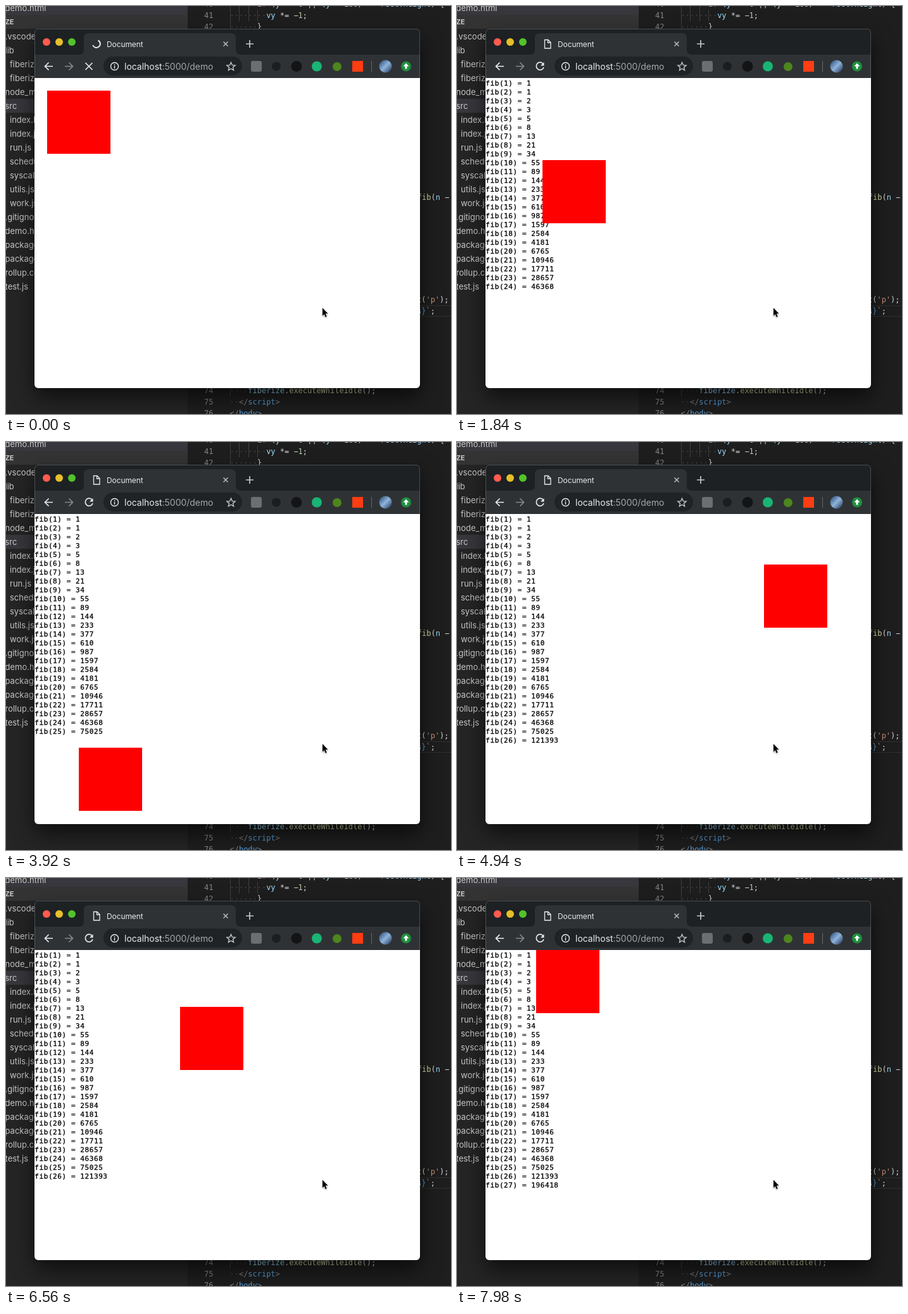
An HTML page for the animation above (8000 ms loop, 703 by 646 pixels).

```html
<!DOCTYPE html>
<html lang="en">
<head>
<meta charset="utf-8">
<title>Fibonacci demo</title>
<style>
  html, body { margin: 0; width: 100%; height: 100%; overflow: hidden; background: #1e1e1e; }
  svg { display: block; width: 703px; height: 646px; }
  text { white-space: pre; }
  .ui { font-family: Inter, "Noto Sans", sans-serif; }
  .mono { font: 12px "DejaVu Sans Mono", monospace; letter-spacing: -.02px; }
  .results { font-size: 11px; letter-spacing: .58px; stroke: #000; stroke-width: .3px; }
  .files { font-size: 13px; fill: #c8c8c8; }
  .code { fill: #d4d4d4; }
  .num { fill: #858585; }
  .fn { fill: #dcdcaa; }
  .var { fill: #9cdcfe; }
  .lit { fill: #b5cea8; }
  .str { fill: #ce9178; }
  .tag { fill: #569cd6; }
  .dim { fill: #808080; }
  .dot { fill: #484848; }
  .key { fill: #c586c0; }
  .window { filter: drop-shadow(0 15px 17px rgba(0, 0, 0, .62)); }
  .cursor { filter: drop-shadow(0 1px 1px rgba(0, 0, 0, .4)); }
  .line { fill: none; stroke: #e8eaed; stroke-width: 1.7; }
</style>
</head>
<body>
<svg viewBox="0 0 703 646">
  <defs>
    <clipPath id="pageClip"><path d="M45 114H654V599a6 6 0 0 1-6 6H51a6 6 0 0 1-6-6z"/></clipPath>
    <linearGradient id="photo" x1="0" y1="0" x2="1" y2="1">
      <stop offset="0" stop-color="#23406f"/>
      <stop offset=".5" stop-color="#8fb4da"/>
      <stop offset="1" stop-color="#1c3158"/>
    </linearGradient>
  </defs>

  <!-- editor -->
  <rect width="703" height="646" fill="#1e1e1e"/>
  <rect width="287" height="646" fill="#252526"/>
  <rect width="287" height="14" fill="#37373d"/>
  <rect y="14" width="287" height="22" fill="#343435"/>
  <rect y="147" width="287" height="22" fill="#37373d"/>
  <g id="files" class="ui files">
    <text x="-1.500" y="8">demo.html</text>
    <text x="-1.500" y="29" font-size="11" font-weight="700">ZE</text>
  </g>
  <path d="M287 474.500H703M287 491.500H703" stroke="#303030"/>
  <path d="M354.500 0V36M368.500 0V24M383.500 0V24M397.500 6V24M354.500 600V618" stroke="#404040"/>
  <g class="mono num">
    <text x="313" y="1">40</text><text x="313" y="19">41</text><text x="313" y="37">42</text>
    <text x="313" y="613">74</text><text x="313" y="631">75</text><text x="313" y="649">76</text>
  </g>
  <g class="mono code">
    <text x="397" y="1"><tspan class="key">if</tspan> (<tspan class="var">y</tspan> &lt;= <tspan class="lit">0</tspan> || (<tspan class="var">y</tspan> + <tspan class="lit">100</tspan>) &gt;= <tspan class="var">rect</tspan>.<tspan class="var">height</tspan>) {</text>
    <text x="353.500" y="19"><tspan class="dot">········</tspan><tspan class="var">vy</tspan> *= −<tspan class="lit">1</tspan>;</text>
    <text x="353.500" y="37"><tspan class="dot">······</tspan>}</text>
    <text x="649.800" y="307"><tspan class="fn">fib</tspan>(<tspan class="var">n</tspan> −</text>
    <text x="649" y="469"><tspan class="fn">t</tspan>(<tspan class="str">'p'</tspan>);</text>
    <text x="649" y="487"><tspan class="var">s</tspan><tspan class="tag">}</tspan><tspan class="str">`</tspan>;</text>
    <text x="353.500" y="613"><tspan class="dot">····</tspan><tspan class="var">fiberize</tspan>.<tspan class="fn">executeWhileIdle</tspan>();</text>
    <text x="353.500" y="631"><tspan class="dot">··</tspan><tspan class="dim">&lt;/</tspan><tspan class="tag">script</tspan><tspan class="dim">&gt;</tspan></text>
    <text x="353.500" y="649"><tspan class="dim">&lt;/</tspan><tspan class="tag">body</tspan><tspan class="dim">&gt;</tspan></text>
  </g>

  <!-- browser window -->
  <rect class="window" x="45" y="36" width="609" height="569" rx="6" fill="#1d2123"/>
  <path d="M115 77q8 0 8-8V51q0-8 8-8H355q8 0 8 8V69q0 8 8 8H654V114H45V77z" fill="#2f3235"/>
  <path d="M45.500 114V42a6 6 0 0 1 6-5.500H648a6 6 0 0 1 5.500 5.500V114" fill="none" stroke="#fff" stroke-opacity=".2"/>
  <circle cx="64" cy="57" r="6" fill="#ff5b50"/>
  <circle cx="84" cy="57" r="6" fill="#e6bf2b"/>
  <circle cx="104" cy="57" r="6" fill="#53c22c"/>
  <text class="ui" x="159" y="64.500" font-size="12" letter-spacing="-.1" fill="#e8eaed">Document</text>
  <path class="line" d="M343.500 56.500l7 7m0-7l-7 7" style="stroke-width:1.4;stroke:#c4c7ca"/>
  <path class="line" d="M385 54V66M379 60H391" style="stroke:#c4c7ca"/>

  <rect x="154" y="80" width="219" height="30" rx="15" fill="#1f2325"/>
  <path class="line" d="M74 95.500H61.500M67.500 89.500l-6 6 6 6"/>
  <path class="line" d="M93 95.500h12.500M99.500 89.500l6 6-6 6" style="stroke:#85888b"/>
  <g class="line" style="stroke-width:1.4">
    <circle cx="171.500" cy="95.500" r="6"/>
    <path d="M171.500 94.500V99M171.500 92V93.400"/>
    <path d="M355.500 89.300l1.900 4.300 4.700.4-3.600 3.100 1.100 4.600-4.100-2.500-4.100 2.500 1.100-4.600-3.600-3.100 4.700-.4z" stroke="#c4c7ca"/>
  </g>
  <text class="ui" x="187" y="100.500" font-size="13.950" fill="#e8eaed">localhost<tspan fill="#a3a8ad">:5000/demo</tspan></text>

  <rect x="387" y="87" width="17" height="17" rx="3" fill="#6b6f72"/>
  <circle cx="427" cy="95.500" r="7" fill="#1b1d1f"/>
  <circle cx="459" cy="95.500" r="8.500" fill="#131415"/>
  <circle cx="491" cy="95.500" r="8" fill="#18b574"/>
  <circle cx="523" cy="96" r="7" fill="#4d861d"/>
  <rect x="547" y="87" width="17" height="17" fill="#ff3d12"/>
  <path d="M577.500 87V104" stroke="#65686b"/>
  <circle cx="599.500" cy="95.500" r="10" fill="url(#photo)"/>
  <circle cx="632" cy="95.500" r="8" fill="#1e8e3e"/>
  <path d="M632 90.500l4.500 5H633.500V99.500h-3V95.500H627.500z" fill="#fff"/>

  <g id="loading" class="line">
    <path id="spinner" d="M145.500 54.500a6 6 0 1 1-8.300 7.500" style="stroke-width:2"/>
    <path d="M125.500 90l11 11m0-11l-11 11"/>
  </g>
  <g id="loaded" class="line">
    <path d="M138.500 53.500h5.500l4 4v9.500h-9.500zM143.500 53.500v4.500h4.500" style="stroke-width:1.3"/>
    <path d="M136 91.500a6 6 0 1 0 1 5.500"/>
    <path d="M137.500 89v5.500H132z" fill="#e8eaed" stroke="none"/>
  </g>

  <g clip-path="url(#pageClip)">
    <rect x="45" y="114" width="609" height="491" fill="#fff"/>
    <g id="results" class="mono results"></g>
    <rect id="box" x="45" y="114" width="100" height="100" fill="#f00"/>
  </g>
  <path class="cursor" d="M500 478v12.500l2.800-2.600 1.900 4.600 2-.8-1.900-4.600h3.700z" stroke="#fff" paint-order="stroke"/>
</svg>
<script>
const LOOP = 8000, TICK = 20, LOADED_AT = 120;
const PHI = (1 + Math.sqrt(5)) / 2;
const $ = id => document.getElementById(id);

function addText(parent, x, y, content) {
  const el = document.createElementNS("http://www.w3.org/2000/svg", "text");
  el.setAttribute("x", x);
  el.setAttribute("y", y);
  el.textContent = content;
  parent.append(el);
  return el;
}

// A leading space marks a file inside a folder.
[".vscode", "lib", " fiberize", " fiberize", "node_modules", "src", " index.html",
 " index.js", " run.js", " scheduler.js", " syscalls.js", " utils.js", " work.js",
 ".gitignore", "demo.html", "package.json", "package.json", "rollup.config.js", "test.js"]
  .forEach((name, i) => addText($("files"), name[0] === " " ? 6 : -1.5, 52.5 + 22 * i, name.trim()));

// Each result takes PHI times as long as the one before.
const results = [];
for (let n = 1, a = 1, b = 1; n <= 27; n++, [a, b] = [b, a + b]) {
  const el = addText($("results"), 45.3, 111.5 + 14 * n, `fib(${n}) = ${a}`);
  results.push({ el, at: 60 + 1640 * PHI ** (n - 24) });
}

const bounce = (d, max) => max - Math.abs(max - d % (2 * max));
const show = (el, on) => el.setAttribute("visibility", on ? "visible" : "hidden");

function draw(now) {
  const tick = Math.floor((now % LOOP) / TICK + 1e-6);
  const time = tick * TICK;
  const travel = 20 + 10 * Math.max(0, tick - 1);
  $("box").setAttribute("transform", `translate(${bounce(travel, 510)} ${bounce(travel, 400)})`);
  $("spinner").setAttribute("transform", `rotate(${time * .27} 143 60)`);
  show($("loading"), time < LOADED_AT);
  show($("loaded"), time >= LOADED_AT);
  for (const { el, at } of results) show(el, time >= at);
}

let start;
function frame() {
  const now = performance.now();
  start ??= now;
  draw(now - start);
  requestAnimationFrame(frame);
}
draw(0);
requestAnimationFrame(frame);
</script>
</body>
</html>
```
